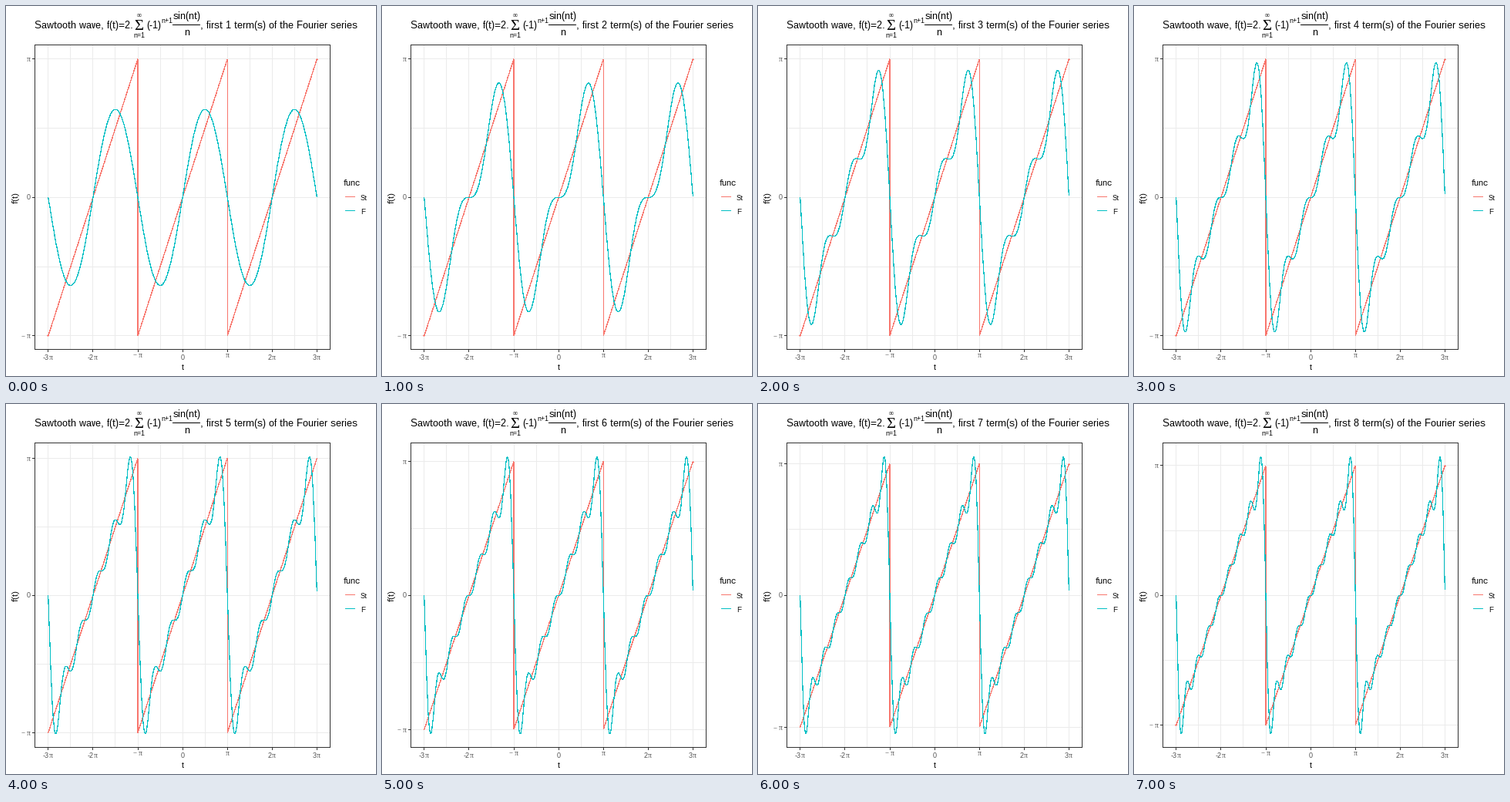
A matplotlib script that plays this animation: 480x480 px, repeating every 8000 ms.

```python
import numpy as np
import matplotlib.pyplot as plt
from matplotlib.animation import FuncAnimation

plt.rcParams.update({
    "path.simplify": False,
    "text.hinting": "native",
    "text.hinting_factor": 1,
})

SIZE, DPI = 480, 72            # at 72 dpi one point is one pixel
PI = np.pi
LEFT, RIGHT, TOP, BOTTOM = 37, 420, 50, 445
X0, X_UNIT = 228.6, 58.1 / PI
Y0, Y_HALF = 247.8, 179.5
RED, TEAL = "#F8766D", "#00BFC4"
GRID, DARK, GREY = "#EBEBEB", "#333333", "#4D4D4D"
SANS, SERIF = "Liberation Sans", "Liberation Serif"

fig = plt.figure(figsize=(SIZE / DPI, SIZE / DPI), dpi=DPI, facecolor="white")
ax = fig.add_axes([0, 0, 1, 1])
ax.set_xlim(0, SIZE)
ax.set_ylim(SIZE, 0)
ax.axis("off")


def pix(v):
    """Centre of the pixel that holds v."""
    return np.floor(np.asarray(v, dtype=float) + 0.5) + 0.5


def line(xs, ys, color, z):
    return ax.plot(pix(xs), pix(ys), color=color, lw=1, antialiased=False,
                   snap=False, solid_capstyle="projecting",
                   solid_joinstyle="round", zorder=z)[0]


def text(x, y, s, size, color="black", font=SANS, ha="left", **kw):
    kw.setdefault("va", "baseline")
    return ax.text(x, y, s, fontsize=size, color=color, family=font,
                   ha=ha, zorder=6, **kw)


def to_x(t):
    return X0 + X_UNIT * t


# Signals
t = np.arange(-3 * PI, 3 * PI, 0.01)
saw = (t + PI) % (2 * PI) - PI


def partial_sum(terms):
    return 2 * sum((-1) ** (n + 1) * np.sin(n * t) / n
                   for n in range(1, terms + 1))


# Vertical grid, x ticks and x labels
for k in np.arange(-3, 3.1, 0.5):
    x = to_x(k * PI)
    line([x, x], [TOP, BOTTOM], GRID, 1)
    if k == int(k):
        line([x, x], [BOTTOM + 1, BOTTOM + 3], DARK, 5)

for k in (-3, -2, 2, 3):
    x = to_x(k * PI)
    num = str(k)
    wide = 9 * (0.556 + 0.333 * (k < 0))
    start = round(x - (wide + 5) / 2 + 0.5)
    text(start, 459, num, 9, GREY)
    text(start + round(wide), 459, "π", 9, GREY, SERIF)
text(229.5, 459, "0", 9, GREY, ha="center")
text(287.5, 456, "π", 9, GREY, SERIF, ha="center")
text(165, 456, "−", 9, GREY, SERIF)
text(177, 456, "π", 9, GREY, SERIF, ha="right")

# Horizontal grid, y ticks and y labels; all but zero move with the scale
line([LEFT, RIGHT], [Y0, Y0], GRID, 1)
line([LEFT - 3, LEFT - 1], [Y0, Y0], DARK, 5)
text(32, 251, "0", 9, GREY, ha="right")
levels = (-PI, -PI / 2, PI / 2, PI)
grid_lines = [line([LEFT, RIGHT], [0, 0], GRID, 1) for _ in levels]
y_ticks = [line([LEFT - 3, LEFT - 1], [0, 0], DARK, 5) for _ in range(2)]
top_pi = text(32, 0, "π", 9, GREY, SERIF, ha="right")
low_pi = text(32, 0, "π", 9, GREY, SERIF, ha="right")
low_minus = text(20, 0, "−", 9, GREY, SERIF)

# Curves and panel border
saw_line = line(to_x(t), 0 * t, RED, 2)
sum_line = line(to_x(t), 0 * t, TEAL, 3)
line([LEFT, RIGHT, RIGHT, LEFT, LEFT], [TOP, TOP, BOTTOM, BOTTOM, TOP], DARK, 5)

# Axis titles and legend
text(229, 472, "t", 11, ha="center")
text(12.5, 248, "f(t)", 11, ha="center", va="center", rotation=90)
text(438, 233, "func", 11)
for y, color, name in ((247, RED, "St"), (265, TEAL, "F")):
    line([440, 452], [y, y], color, 5)
    text(460, y + 5, name, 9)

# Title with its formula
text(37, 29, "Sawtooth wave, f(t)=2.", 13)
text(172.5, 31, "Σ", 20, font=SERIF, ha="center")
text(172.5, 15, "∞", 9, font=SERIF, ha="center")
text(165, 41, "n=1", 9)
text(182, 29, "(-1)", 13)
text(201, 22, "n+1", 9)
text(234.5, 17, "sin(nt)", 13, ha="center")
line([216, 251], [24, 24], "black", 6)
text(234.5, 38, "n", 13, ha="center")
tail = text(252, 29, "", 13)


def update(i):
    terms = i + 1
    total = partial_sum(terms)
    unit = Y_HALF / max(PI, np.abs(total).max())

    def to_y(v):
        return Y0 - unit * v

    saw_line.set_ydata(pix(to_y(saw)))
    sum_line.set_ydata(pix(to_y(total)))
    for item, level in zip(grid_lines, levels):
        item.set_ydata([pix(to_y(level))] * 2)
    for item, level in zip(y_ticks, (-PI, PI)):
        item.set_ydata([pix(to_y(level))] * 2)
    top_pi.set_y(round(to_y(PI)) + 4)
    for item in (low_pi, low_minus):
        item.set_y(round(to_y(-PI)) + 4)
    tail.set_text(f", first {terms} term(s) of the Fourier series")
    return []


anim = FuncAnimation(fig, update, frames=8, interval=1000,
                     repeat=True, repeat_delay=0, blit=False)
plt.show()
```
